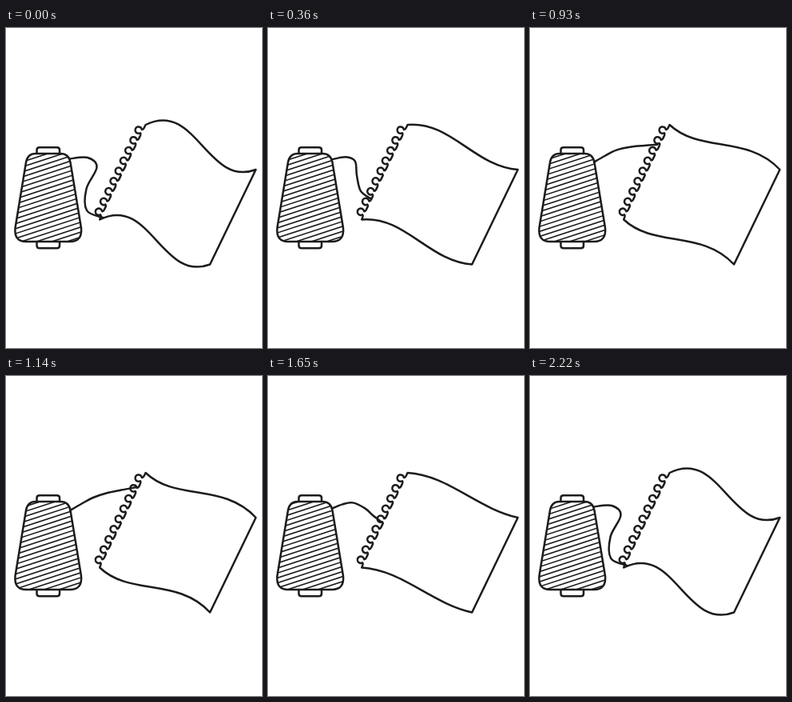
Animation, 320 px wide and 400 px high, one loop 2250 ms. Source, as an HTML page:

```html
<!DOCTYPE html>
<html lang="en">
<head>
<meta charset="utf-8">
<title>Spool and cloth</title>
<style>
  html, body { margin: 0; width: 100%; height: 100%; overflow: hidden; background: #fff; }
  svg { display: block; width: 100vw; height: 100vh; }
  .ink { fill: none; stroke: #1d1b1c; stroke-width: 2.5; stroke-linecap: round; stroke-linejoin: round; }
  .thin { stroke-width: 1.6; }
</style>
</head>
<body>
<svg viewBox="0 0 320 400" xmlns="http://www.w3.org/2000/svg">
  <defs>
    <clipPath id="inside"><use href="#body"/></clipPath>
  </defs>
  <path id="cloth" class="ink"/>
  <path id="thread" class="ink"/>
  <path id="body" class="ink" d="M37 157H68Q78.5 157 80.5 168L94 250Q95.5 267 80 267H25Q10 267 11.5 250L25 168Q27 157 37 157Z"/>
  <g clip-path="url(#inside)"><path id="wraps" class="ink thin"/></g>
  <path class="ink" d="M38.5 157V152.5Q38.5 149.3 42 149.3H63.5Q67 149.3 67 152.5V157M38.5 267V272Q38.5 275.3 42 275.3H63.5Q67 275.3 67 272V267"/>
</svg>
<script>
const LOOP = 2250, STEP = 30, CREST = 1050;
const el = id => document.getElementById(id);
const mix = (a, b, k) => a + (b - a) * k;
const mixPt = (p, q, k) => p.map((v, j) => mix(v, q[j], k));
const ease = k => (1 - Math.cos(Math.PI * k)) / 2;
const str = p => p.map(v => v.toFixed(2)).join(" ");

// Cloth: both long edges are one S curve whose handles swing between two places
const TOP = [174.5, 121], TIP = [312.3, 177];
const swing1 = [[237, 89.5], [212, 158]];
const swing2 = [[252, 200], [272, 132]];
const low = ([x, y]) => [x - 57.3, y + 118.5];

// Scalloped edge, from the lower left corner up to the upper left one
const scallops = (() => {
  const at = (s, n) => str([TOP[0] - 0.438 * s - 0.899 * n, TOP[1] + 0.899 * s - 0.438 * n]);
  let d = "";
  for (let i = 8; i >= 0; i--) {
    const s = 9.8 + 14.2 * i;
    d += `L${at(s + 5, 0)}Q${at(s + 2.8, 0)} ${at(s + 2.3, 1.5)}` +
         `A4.2 4.2 0 1 1 ${at(s - 2.3, 1.5)}Q${at(s - 2.8, 0)} ${at(s - 5, 0)}`;
  }
  return d;
})();

function clothPath(t) {
  const k = t < CREST ? ease((t / CREST) ** 0.8) : ease((LOOP - t) / (LOOP - CREST));
  const a = mixPt(...swing1, k), b = mixPt(...swing2, k);
  return `M${str(TOP)}C${[a, b, TIP].map(str).join(" ")}` +
    `L${str(low(TIP))}C${[b, a, TOP].map(p => str(low(p))).join(" ")}${scallops}Z`;
}

// Thread: a slack pose bends through a middle one to a taut one and back
const slack = [[79, 163.5], [102, 162], [113.5, 174], [100.5, 201], [101, 228], [121, 237]];
const bend = [[80, 165.5], [89, 160], [101, 156], [126, 163], [136, 172.5], [136, 186]];
const taut = [[80, 168], [94, 160], [109, 152], [127, 146], [144, 142.5], [163, 139]];

function threadPath(t) {
  const k = ease(2 * t / LOOP), last = slack.length - 1;
  const pts = slack.map((p, i) =>
    mixPt(mixPt(p, bend[i], k), mixPt(bend[i], taut[i], k), k));
  const pt = n => pts[Math.max(0, Math.min(last, n))];
  let d = "M" + str(pts[0]);
  for (let n = 0; n < last; n++) {
    const [p, c, e, f] = [n - 1, n, n + 1, n + 2].map(pt);
    const out = c.map((v, j) => v + (e[j] - p[j]) / 6);
    const into = e.map((v, j) => v - (f[j] - c[j]) / 6);
    d += "C" + [out, into, e].map(str).join(" ");
  }
  return d;
}

function wrapsPath(t) {
  const gap = 6.2, shift = gap * t / LOOP;
  let d = "";
  for (let y = 160; y < 305; y += gap) d += `M5 ${y - shift}l95 -31`;
  return d;
}

function draw(t) {
  el("cloth").setAttribute("d", clothPath(t));
  el("thread").setAttribute("d", threadPath(t));
  el("wraps").setAttribute("d", wrapsPath(t));
}

const start = performance.now();
function tick() {
  const t = (performance.now() - start) % LOOP;
  draw(Math.floor(t / STEP) * STEP);
  requestAnimationFrame(tick);
}
draw(0);
requestAnimationFrame(tick);
</script>
</body>
</html>
```
